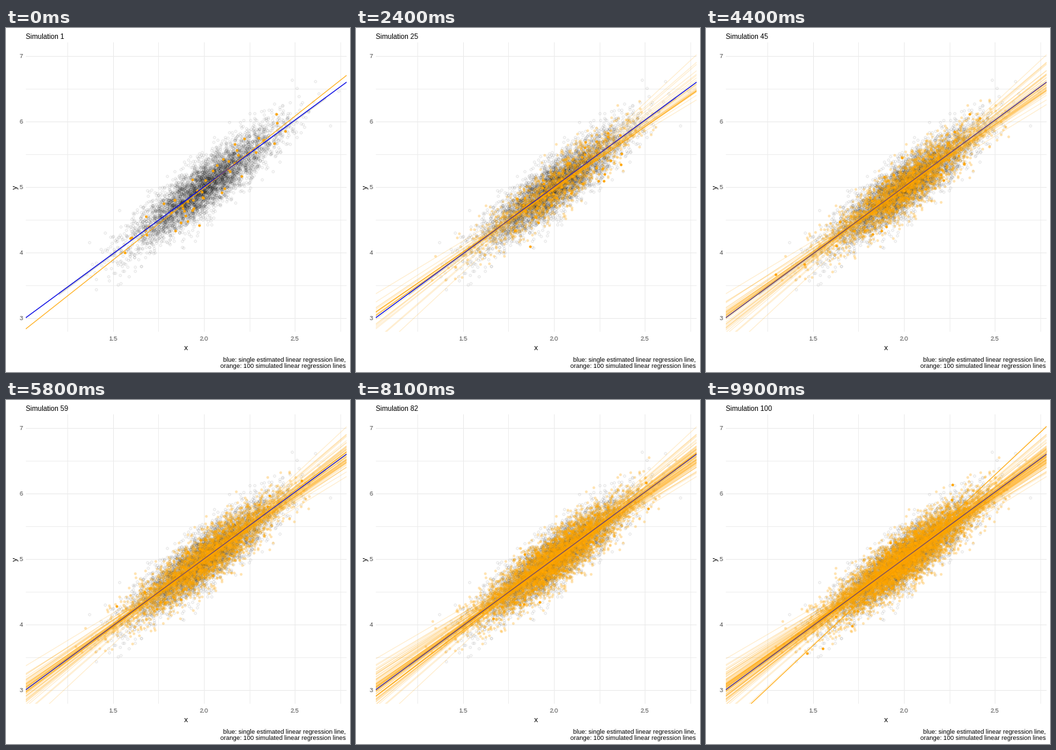
Animation, 504 px wide and 504 px high, one loop 10000 ms. Source, as a matplotlib script:

```python
import matplotlib.pyplot as plt
import numpy as np
from matplotlib.animation import FuncAnimation
from matplotlib.collections import LineCollection

SIZE, DPI = 504, 72
LEFT, TOP, RIGHT, BOTTOM = 29, 21, 499, 445
SIMS, PER_SIM = 100, 50
INTERCEPT, SLOPE = 0.925, 2.0385
MEAN_X, SD_X, SD_RES = 2.0, 0.2, 0.2
ORANGE = (1.0, 0.647, 0.0)
GRID, GREY = "#EBEBEB", "#4D4D4D"

plt.rcParams["font.family"] = "Liberation Sans"


def to_px(x):
    return 290 + 266.5 * (x - 2)


def to_py(y):
    return 425 - 96 * (y - 3)


XLIM = 2 + (np.array([LEFT, RIGHT]) - 290) / 266.5
YLIM = 3 + (425 - np.array([BOTTOM, TOP])) / 96

# Data: one big sample, and a fitted line for each small sample
rng = np.random.default_rng(12)


def sample(*shape):
    x = rng.normal(MEAN_X, SD_X, shape)
    return x, INTERCEPT + SLOPE * x + rng.normal(0, SD_RES, shape)


cloud_x, cloud_y = sample(SIMS * PER_SIM)
sim_x, sim_y = sample(SIMS, PER_SIM)
lines = [np.column_stack([XLIM, np.polyval(np.polyfit(x, y, 1), XLIM)])
         for x, y in zip(sim_x, sim_y)]

fig = plt.figure(figsize=(SIZE / DPI, SIZE / DPI), dpi=DPI, facecolor="white")
ax = fig.add_axes([LEFT / SIZE, 1 - BOTTOM / SIZE,
                   (RIGHT - LEFT) / SIZE, (BOTTOM - TOP) / SIZE])
ax.axis("off")


def label(px, py, text, size, color="black", **kw):
    return fig.text(px / SIZE, 1 - py / SIZE, text, fontsize=size, color=color, **kw)


def dots(face, edge, z, size=3.1):
    return ax.plot([], [], "o", ms=size, mew=0.8, mfc=face, mec=edge, zorder=z)[0]


def line(x, y, color, z, **kw):
    return ax.plot(x, y, color=color, lw=1, zorder=z, **kw)[0]


# Grid and axis labels
for i, v in enumerate(np.arange(1.25, 2.8, 0.25)):
    ax.axvline(v, color=GRID, lw=1 if i % 2 else 0.8, zorder=0)
    if i % 2:
        label(to_px(v), 458, f"{v:.1f}", 9.2, GREY, ha="center")
for i, v in enumerate(np.arange(3, 7.1, 0.5)):
    ax.axhline(v, color=GRID, lw=0.8 if i % 2 else 1, zorder=0)
    if i % 2 == 0:
        label(24.5, to_py(v) + 3.5, f"{v:.0f}", 9.2, GREY, ha="right")
label(263.5, 472, "x", 11, ha="center")
label(14, 233.5, "y", 11, ha="center", va="center", rotation=90)
label(497.5, 488.7, "blue: single estimated linear regression line,", 9.1, ha="right")
label(497.5, 497.7, "orange: 100 simulated linear regression lines", 9.1, ha="right")
title = label(29, 15.7, "", 10.3)

# Observations
dots("none", (0, 0, 0, 0.13), 1, 3.4).set_data(cloud_x, cloud_y)
old_dots = dots(ORANGE + (0.22,), ORANGE + (0.3,), 2)
new_dots = dots(ORANGE, ORANGE, 3)

# Regression lines, with the confidence band of the big sample
span = np.linspace(1.2, 2.67, 60)
fit = INTERCEPT + SLOPE * span
half = 1.96 * SD_RES / np.sqrt(cloud_x.size) * np.hypot(1, (span - MEAN_X) / SD_X)
ax.fill_between(span, fit - half, fit + half, color="#999999", alpha=0.4,
                lw=0, zorder=4)
blue = INTERCEPT + SLOPE * XLIM
line(XLIM, blue, "blue", 4)
old_lines = LineCollection([], colors=[ORANGE + (0.22,)], linewidths=1, zorder=5)
ax.add_collection(old_lines, autolim=False)
new_line = line([], [], ORANGE, 6)
line(XLIM, blue, "#0000C8", 7, alpha=0.6)
ax.set(xlim=XLIM, ylim=YLIM)


def update(i):
    title.set_text(f"Simulation {i + 1}")
    old_dots.set_data(sim_x[:i].ravel(), sim_y[:i].ravel())
    new_dots.set_data(sim_x[i], sim_y[i])
    old_lines.set_segments(lines[:i])
    new_line.set_data(*lines[i].T)
    return title, old_dots, new_dots, old_lines, new_line


anim = FuncAnimation(fig, update, frames=SIMS, interval=100, repeat=True,
                     repeat_delay=0, blit=False)
plt.show()
```
